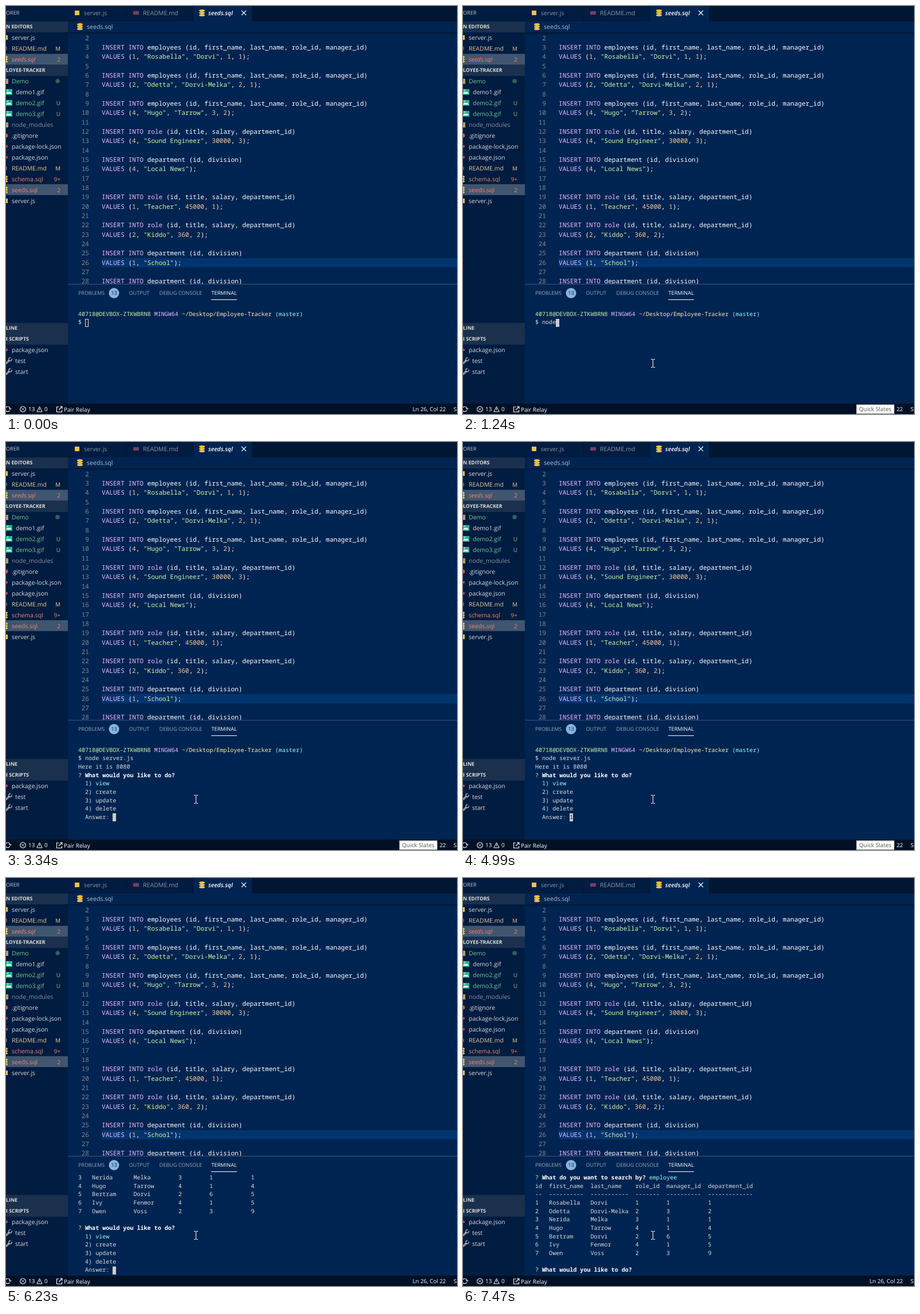
These frames come from a looping animation (787 px wide and 712 px high, 8000 ms). An HTML page with a canvas:

```html
<!DOCTYPE html>
<html lang="en">
<head>
<meta charset="utf-8">
<title>Editor and terminal session</title>
<style>
html, body { margin: 0; width: 100%; height: 100%; overflow: hidden; background: #002451; }
canvas { display: block; }
</style>
</head>
<body>
<canvas id="stage" width="787" height="712"></canvas>
<script>
const ctx = document.getElementById('stage').getContext('2d');
const LOOP = 8000;
const UI = '"Open Sans", "Noto Sans", sans-serif';
const MONO = '"Noto Sans Mono", "DejaVu Sans Mono", monospace';
const C = {
  editor: '#002451', side: '#001c40', strip: '#001733', status: '#001126',
  header: '#1a304d', select: '#405570', line: '#00346e', border: '#404f7d',
  text: '#dcdcdc', white: '#ffffff', dim: '#8c919c', number: '#858585',
  purple: '#ebbbff', green: '#d1f1a9', orange: '#ffc58f', yellow: '#ffeead', cyan: '#99ffff',
  error: '#f48468', modified: '#e8c690', added: '#73c991', gold: '#f0c050', red: '#c8324b'
};

function rect(x, y, w, h, color) {
  ctx.fillStyle = color;
  ctx.fillRect(x, y, w, h);
}
function disc(x, y, r, color) {
  ctx.fillStyle = color;
  ctx.beginPath();
  ctx.arc(x, y, r, 0, Math.PI * 2);
  ctx.fill();
}
function stroke(points, color, width = 1) {
  ctx.strokeStyle = color;
  ctx.lineWidth = width;
  ctx.beginPath();
  points.forEach(([x, y], i) => i ? ctx.lineTo(x, y) : ctx.moveTo(x, y));
  ctx.stroke();
}
function ring(x, y, r, color, from = 0, to = Math.PI * 2) {
  ctx.strokeStyle = color;
  ctx.lineWidth = 1.1;
  ctx.beginPath();
  ctx.arc(x, y, r, from, to);
  ctx.stroke();
}
// y is the middle of the capitals
function label(text, x, y, color, size = 10.6, style = '500', align = 'left') {
  ctx.font = `${style} ${size}px ${UI}`;
  ctx.fillStyle = color;
  ctx.textAlign = align;
  ctx.fillText(text, x, Math.round(y + size * 0.35));
  ctx.textAlign = 'left';
}

function database(x, y) {
  for (let i = -1; i <= 1; i++) {
    ctx.fillStyle = C.gold;
    ctx.beginPath();
    ctx.ellipse(x, y + i * 4, 5, 2.1, 0, 0, Math.PI * 2);
    ctx.fill();
    rect(x - 5, y + i * 4, 10, 1, C.gold);
  }
}
function picture(x, y) {
  rect(x, y - 5, 12, 10, '#20b590');
  ctx.fillStyle = '#e8fff8';
  ctx.beginPath();
  [[1, 3], [4, -1], [6, 1], [8, -1], [11, 3]].forEach(([dx, dy]) => ctx.lineTo(x + dx, y + dy));
  ctx.fill();
  disc(x + 4, y - 3, 1, '#e8fff8');
}
function wrench(x, y) {
  stroke([[x, y + 5], [x + 5.5, y - 0.5]], C.text, 2.6);
  stroke([[x, y + 5], [x + 5.5, y - 0.5]], C.side, 0.9);
  ring(x + 7.5, y - 2.5, 2.8, C.text, -0.3, 5);
}
const icons = {
  script: y => rect(-5, y - 4, 8, 8, C.gold),
  doc: y => rect(-8, y - 3, 10, 6, '#75405f'),
  db: y => database(-2, y),
  folder: y => { rect(-6, y - 4, 10, 9, '#b3a15c'); rect(-6, y - 2, 8, 1, '#6f6a45'); },
  image: y => picture(-1, y),
  git: y => disc(0, y, 3.5, '#dd5040'),
  pack: y => rect(-4, y - 2, 7, 4, C.red),
  wrench: y => wrench(0, y)
};

const files = [
  [55, 10, 'server.js', C.text, '', 'script'],
  [74, 10, 'README.md', C.modified, 'M', 'doc'],
  [93, 10, 'seeds.sql', C.error, '2', 'db', 'italic 500'],
  [131, 10, 'Demo', C.added, '', 'folder'],
  [150, 17, 'demo1.gif', C.text, '', 'image'],
  [169, 17, 'demo2.gif', C.added, 'U', 'image'],
  [188, 17, 'demo3.gif', C.added, 'U', 'image'],
  [207, 10, 'node_modules', C.dim, '', 'folder'],
  [226, 10, '.gitignore', C.text, '', 'git'],
  [245, 10, 'package-lock.json', C.text, '', 'pack'],
  [264, 10, 'package.json', C.text, '', 'pack'],
  [283, 10, 'README.md', C.modified, 'M', 'doc'],
  [302, 10, 'schema.sql', C.error, '9+', 'db'],
  [321, 10, 'seeds.sql', C.error, '2', 'db'],
  [340, 10, 'server.js', C.text, '', 'script'],
  [600, 10, 'package.json', C.text, '', 'pack'],
  [619, 16, 'test', C.text, '', 'wrench'],
  [638, 16, 'start', C.text, '', 'wrench']
];

function drawSidebar() {
  rect(0, 0, 108, 694, C.side);
  label('ORER', 0, 12, '#c4c8d0', 9.1);
  [[27, 'N EDITORS'], [103, 'LOYEE-TRACKER'], [553, 'LINE'], [572, 'I SCRIPTS']].forEach(([y, text]) => {
    rect(0, y, 108, 19, C.header);
    label(text, 0, y + 9, C.text, 8.8, 'bold');
  });
  rect(0, 83.5, 108, 19, C.select);
  rect(0, 311, 108, 19, C.select);
  for (const [y, x, name, color, mark, icon, style] of files) {
    icons[icon](y);
    label(name, x, y, color, 10.5, style);
    label(mark, 95, y, color, 10, '500', 'right');
  }
  disc(90, 131, 3.8, '#2f6160');
}

function drawTabs() {
  rect(108, 0, 679, 27, C.strip);
  rect(108, 0, 102, 27, C.side);
  rect(211, 0, 115, 27, C.side);
  rect(327, 0, 102, 27, C.editor);
  rect(120, 8, 8, 8, C.gold);
  label('server.js', 136, 12, '#8d97a6', 10.3);
  rect(222, 9, 10, 6, '#75405f');
  label('README.md', 239, 12, '#8d97a6');
  database(342, 12);
  label('seeds.sql', 353, 12, C.white, 10.4, 'italic 600');
  stroke([[411, 8], [419, 16]], C.white, 1.1);
  stroke([[419, 8], [411, 16]], C.white, 1.1);
  database(129, 36);
  label('seeds.sql', 141, 36, '#b4bdcc');
  const shade = ctx.createLinearGradient(0, 46, 0, 50);
  shade.addColorStop(0, 'rgba(0,0,0,.4)');
  shade.addColorStop(1, 'rgba(0,0,0,0)');
  rect(108, 46, 679, 4, shade);
}

const insertEmployee = 'INSERT INTO employees (id, first_name, last_name, role_id, manager_id)';
const insertRole = 'INSERT INTO role (id, title, salary, department_id)';
const insertDepartment = 'INSERT INTO department (id, division)';
const code = [
  '',
  insertEmployee, 'VALUES (1, "Rosabella", "Dorvi", 1, 1);', '',
  insertEmployee, 'VALUES (2, "Odetta", "Dorvi-Melka", 2, 1);', '',
  insertEmployee, 'VALUES (4, "Hugo", "Tarrow", 3, 2);', '',
  insertRole, 'VALUES (4, "Sound Engineer", 30000, 3);', '',
  insertDepartment, 'VALUES (4, "Local News");', '', '',
  insertRole, 'VALUES (1, "Teacher", 45000, 1);', '',
  insertRole, 'VALUES (2, "Kiddo", 360, 2);', '',
  insertDepartment, 'VALUES (1, "School");', '',
  insertDepartment
];
const TOKEN = /("[^"]*"|\b(?:INSERT|INTO|VALUES|role)\b|\b\d+\b)/;

function tokenColor(token) {
  if (token[0] === '"') return C.green;
  if (/^\d+$/.test(token)) return C.orange;
  return TOKEN.test(token) ? C.purple : C.white;
}
// Draws coloured pieces of text on a fixed character grid
function drawSpans(spans, x, baseline, size) {
  let column = 0;
  for (const [text, color, weight = 500] of spans) {
    ctx.font = `${weight} ${size}px ${MONO}`;
    ctx.fillStyle = color;
    ctx.fillText(text, x + column * size * 0.6, baseline);
    column += text.length;
  }
}
function drawCode() {
  ctx.save();
  ctx.beginPath();
  ctx.rect(108, 46, 679, 439);
  ctx.clip();
  rect(167, 440, 620, 16, C.line);
  code.forEach((line, i) => {
    const baseline = Math.round(59.7 + i * 16.33);
    const number = String(i + 2);
    drawSpans([[number, C.number, 400]], 145 - number.length * 6.63, baseline, 11.05);
    const spans = line.split(TOKEN).filter(Boolean).map(s => [s, tokenColor(s)]);
    drawSpans(spans, 167, baseline, 11.05);
  });
  ctx.restore();
}

function drawPanelHead() {
  rect(108, 485, 679, 1, C.border);
  const dim = '#9aa5b8';
  label('PROBLEMS', 126, 501, dim, 8.95);
  disc(188.5, 501, 9, '#8ab4e0');
  label('13', 188.5, 501, C.editor, 9.2, '400', 'center');
  label('OUTPUT', 214.5, 501, dim, 9.1);
  label('DEBUG CONSOLE', 267.5, 501, dim, 9.1);
  label('TERMINAL', 358.5, 501, C.white, 9.2);
  rect(358, 512, 45, 1, C.white);
}

function drawStatus(tooltip) {
  rect(0, 694, 787, 18, C.status);
  ring(3, 703.5, 4.3, C.white, -2.6, 0);
  ring(3, 703.5, 4.3, C.white, 0.5, 3);
  stroke([[5.3, 702], [7.4, 704.2], [9.5, 702]], C.white);
  ring(29.5, 703.5, 4.8, C.white);
  stroke([[27.5, 701.5], [31.5, 705.5]], C.white);
  stroke([[31.5, 701.5], [27.5, 705.5]], C.white);
  label('13', 39, 704, C.white, 9.9);
  stroke([[58.5, 699], [53.8, 708], [63.2, 708], [58.5, 699]], C.white);
  stroke([[58.5, 702], [58.5, 705.2]], C.white);
  label('0', 67, 704, C.white, 9.9);
  stroke([[92, 699.5], [88.5, 699.5], [88.5, 708.5], [97.5, 708.5], [97.5, 705]], C.white, 1.1);
  stroke([[92, 705], [97.5, 699.5]], C.white, 1.1);
  stroke([[94, 699], [98, 699], [98, 703]], C.white, 1.1);
  label('Pair Relay', 101, 704, C.white, 10);
  label('Ln 26, Col 22', 709.5, 704, C.white, 9.8);
  label('S', 781, 704, C.white, 9.8);
  if (tooltip <= 0) return;
  ctx.globalAlpha = tooltip;
  rect(686, 695, 67, 17, '#767676');
  rect(687, 696, 65, 15, C.white);
  label('Quick Slates', 691, 703, '#575757', 10);
  ctx.globalAlpha = 1;
}

const plain = text => [[text, C.text]];
const question = (text, answer = '') => [['? ', C.green], [text + ' ', C.white, 700], [answer, C.cyan]];
const menu = (text, items, selected = 0) => [
  question(text),
  ...items.map((item, i) => [[`  ${i + 1}) ${item}`, i === selected ? C.cyan : C.text]]),
  plain('  Answer: ')
];
const ASK_ACTION = 'What would you like to do?';
const ASK_FIELD = 'What do you want to search by?';
const actions = ['view', 'create', 'update', 'delete'];
const fields = ['employee', 'role', 'department', 'manager'];
const widths = [2, 10, 11, 7, 10, 13];
const tableRow = cells => plain(cells.map((cell, i) => String(cell).padEnd(widths[i])).join('  '));
const table = [
  tableRow(['id', 'first_name', 'last_name', 'role_id', 'manager_id', 'department_id']),
  tableRow(widths.map(n => '-'.repeat(n))),
  ...[
    'Rosabella Dorvi 1 1 1', 'Odetta Dorvi-Melka 2 3 2', 'Nerida Melka 3 1 1', 'Hugo Tarrow 4 1 4',
    'Bertram Dorvi 2 6 5', 'Ivy Fenmor 4 1 5', 'Owen Voss 2 3 9'
  ].map((row, i) => tableRow([i + 1, ...row.split(' ')]))
];
const prompt = [
  ['40718@DEVBOX-ZTKWBRN8 ', C.green], ['MINGW64 ', C.purple],
  ['~/Desktop/Employee-Tracker ', C.yellow], ['(master)', C.cyan]
];
const COMMAND = 'node server.js';
const keyTimes = [780, 1010, 1070, 1240, 1390, 1560, 1635, 1710, 1950, 2090, 2175, 2260, 2490, 2640];
const scrollTimes = [7160, 7160, 7240, 7320, 7470];
const countPassed = (times, t) => times.filter(time => t >= time).length;

// Lines of the terminal buffer; the cursor follows the last one
function terminalLines(t) {
  const typed = COMMAND.slice(0, countPassed(keyTimes, t));
  const lines = [[], prompt, plain('$ ' + typed)];
  if (t < 2810) return lines;
  if (t < 3340) return [...lines, []];
  lines.push(plain('Here it is 8080'));
  if (t < 5220) return [...lines, ...menu(ASK_ACTION, actions, t >= 4290 && t < 4990 ? 1 : 0)];
  lines.push(question(ASK_ACTION, 'view'));
  if (t < 5300) return [...lines, []];
  if (t < 6140) return [...lines, ...menu(ASK_FIELD, fields)];
  lines.push(question(ASK_FIELD, 'employee'));
  if (t < 6230) return [...lines, []];
  return [...lines, ...table, [], ...menu(ASK_ACTION, actions)];
}

function drawTerminal(t) {
  const ROWS = 12, PITCH = 14.65, TOP = 516.4, LEFT = 126, SIZE = 10.05;
  const baseline = row => Math.round(TOP + row * PITCH + 9.8);
  const lines = terminalLines(t);
  const first = Math.max(0, lines.length - ROWS) - countPassed(scrollTimes, t);
  lines.slice(first, first + ROWS).forEach((line, row) => drawSpans(line, LEFT, baseline(row), SIZE));

  const row = lines.length - 1 - first;
  if (row >= ROWS) return;
  const column = lines[lines.length - 1].reduce((n, [text]) => n + text.length, 0);
  const x = Math.round(LEFT + column * SIZE * 0.6);
  const y = Math.round(TOP + row * PITCH);
  if (t < 320) {
    ctx.strokeStyle = C.text;
    ctx.lineWidth = 1;
    ctx.strokeRect(x + 0.5, y + 0.5, 5, 13);
    return;
  }
  rect(x, y, 6, 14, '#cccccc');
  // Arrow keys place the choice under the cursor
  if (t >= 4290 && t < 5220) {
    drawSpans([[t < 4990 ? '2' : '1', C.editor]], x, baseline(row), SIZE);
  }
}

function drawPointer(t) {
  if (t < 70) return;
  const [x, y] = t < 150 ? [381, 639] : [331, 623];
  rect(x, y - 6, 1, 13, C.white);
  for (const edge of [y - 7, y + 7]) {
    rect(x - 3, edge, 3, 1, C.white);
    rect(x + 1, edge, 3, 1, C.white);
  }
}

function tooltipAlpha(t) {
  if (t < 320 || t >= 5680) return 0;
  if (t < 600) return Math.floor((t - 320) / 70) / 4;
  return t < 5450 ? 1 : (3 - Math.floor((t - 5450) / 76.7)) / 4;
}

function draw() {
  const t = performance.now() % LOOP;
  ctx.textRendering = 'geometricPrecision';
  rect(0, 0, 787, 712, C.editor);
  drawSidebar();
  drawTabs();
  drawCode();
  drawPanelHead();
  drawTerminal(t);
  drawStatus(tooltipAlpha(t));
  drawPointer(t);
  requestAnimationFrame(draw);
}
draw();
</script>
</body>
</html>
```
